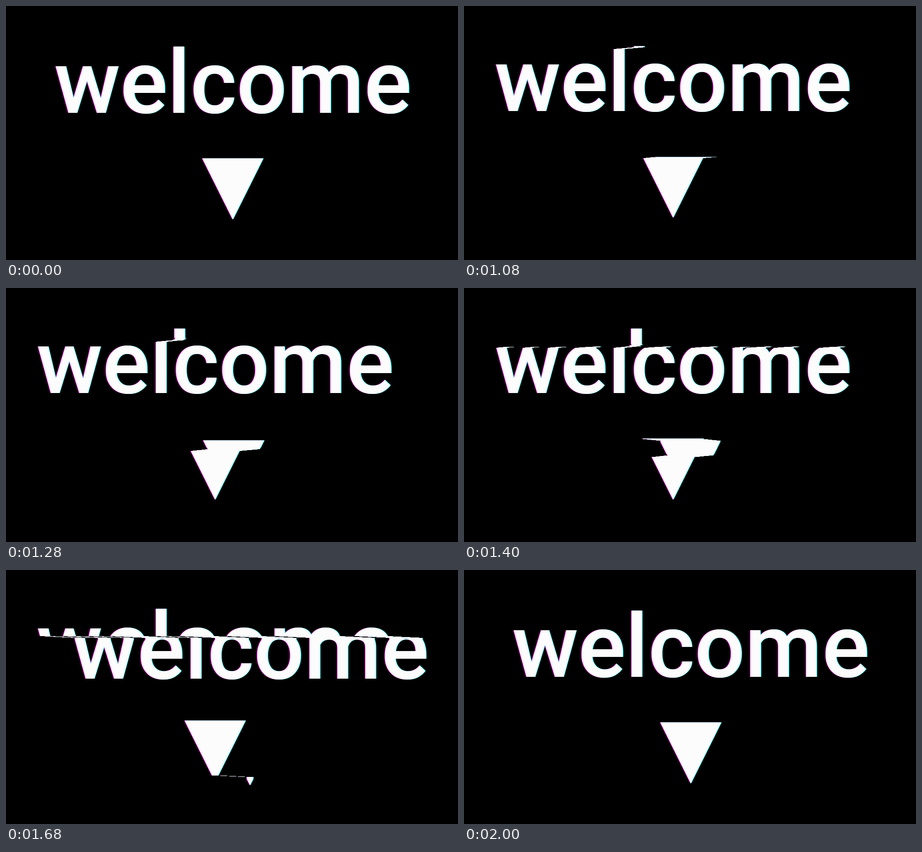
An HTML page with a canvas that plays this animation: 998x561 px, repeating every 5 s.

```html
<!DOCTYPE html>
<html lang="en">
<head>
<meta charset="utf-8">
<title>welcome</title>
<style>
html, body { margin: 0; width: 100%; height: 100%; overflow: hidden; background: #000; }
canvas { display: block; }
</style>
</head>
<body>
<canvas id="stage" width="998" height="561"></canvas>
<script>
const W = 998, H = 561, LOOP = 5000, STEP = 40;
const GLITCH_START = 1000, GLITCH_END = 2000;
const REST = { x: -39, y: -4 };
const ctx = document.getElementById('stage').getContext('2d');

// Key points of the sweep: [ms, value]
const bottomKeys = [[1000, 84], [1160, 105], [1400, 132], [1560, 195], [1840, 328], [2000, 408]];
const topKeys = [[1560, 76], [1840, 238], [2000, 316]];
const shiftXKeys = [[1000, 8], [1160, 5], [1400, -1], [1560, 23], [1680, 38], [1840, 10], [2000, 0]];
const shiftYKeys = [[1400, 0], [1560, 2], [1640, 5], [1840, 1], [2000, 0]];
const noiseKeys = [[1000, 2], [1400, 8], [1560, 26], [1840, 12], [2000, 4]];

const clamp = v => Math.max(0, Math.min(1, v));
const mix = (a, b, k) => a + (b - a) * k;

function at(keys, t) {
  if (t <= keys[0][0]) return keys[0][1];
  for (let i = 1; i < keys.length; i++) {
    const [t0, v0] = keys[i - 1], [t1, v1] = keys[i];
    if (t <= t1) return mix(v0, v1, (t - t0) / (t1 - t0));
  }
  return keys[keys.length - 1][1];
}

function rand(seed) {
  const s = Math.sin(seed * 12.9898) * 43758.5453;
  return s - Math.floor(s);
}

function drawArt() {
  const art = document.createElement('canvas');
  art.width = W;
  art.height = H;
  const g = art.getContext('2d');
  g.fillStyle = '#000';
  g.fillRect(0, 0, W, H);
  g.font = '500 195.5px Roboto, sans-serif';
  const m = g.measureText('welcome');
  const x = 499.5 - (m.actualBoundingBoxRight - m.actualBoundingBoxLeft) / 2;
  for (const [color, dx] of [['#ff00e6', -1.2], ['#00f0f0', 1.2], ['#fcfcfc', 0]]) {
    g.fillStyle = color;
    g.fillText('welcome', x + dx, 235.6);
    g.beginPath();
    g.moveTo(433.3 + dx, 336.6);
    g.lineTo(568 + dx, 336.6);
    g.lineTo(500.7 + dx, 471.4);
    g.fill();
  }
  return art;
}

// How far a row lies inside a band, with soft edges
function inside(y, [top, bottom], soft) {
  return clamp(Math.min((y - top) / soft, (bottom - y) / soft));
}

function drawGlitch(t) {
  const bottom = at(bottomKeys, t);
  const bands = [[at(topKeys, t), bottom], [bottom + 201, bottom + 241]];
  const gx = at(shiftXKeys, t), gy = at(shiftYKeys, t), noise = at(noiseKeys, t);
  for (let y = 0; y < H; y++) {
    const kx = Math.max(...bands.map(b => inside(y, b, 4)));
    const ky = Math.max(...bands.map(b => inside(y, b, 8)));
    let dx = mix(REST.x, gx, kx);
    const edge = bands[0][1] - y;
    if (edge > 0 && edge < 9) dx += (rand(y * 7 + t) - 0.6) * noise;
    const dy = Math.round(mix(REST.y, gy, ky));
    const sy = y - dy;
    if (sy >= 0 && sy < H) ctx.drawImage(art, 0, sy, W, 1, Math.round(dx), y, W, 1);
  }
}

const art = drawArt();

function frame(now) {
  const t = Math.floor((now % LOOP) / STEP) * STEP;
  ctx.fillStyle = '#000';
  ctx.fillRect(0, 0, W, H);
  if (t >= GLITCH_START && t < GLITCH_END) drawGlitch(t);
  else ctx.drawImage(art, 0, 0);
  requestAnimationFrame(() => frame(performance.now() - start));
}

const start = performance.now();
frame(0);
</script>
</body>
</html>
```
